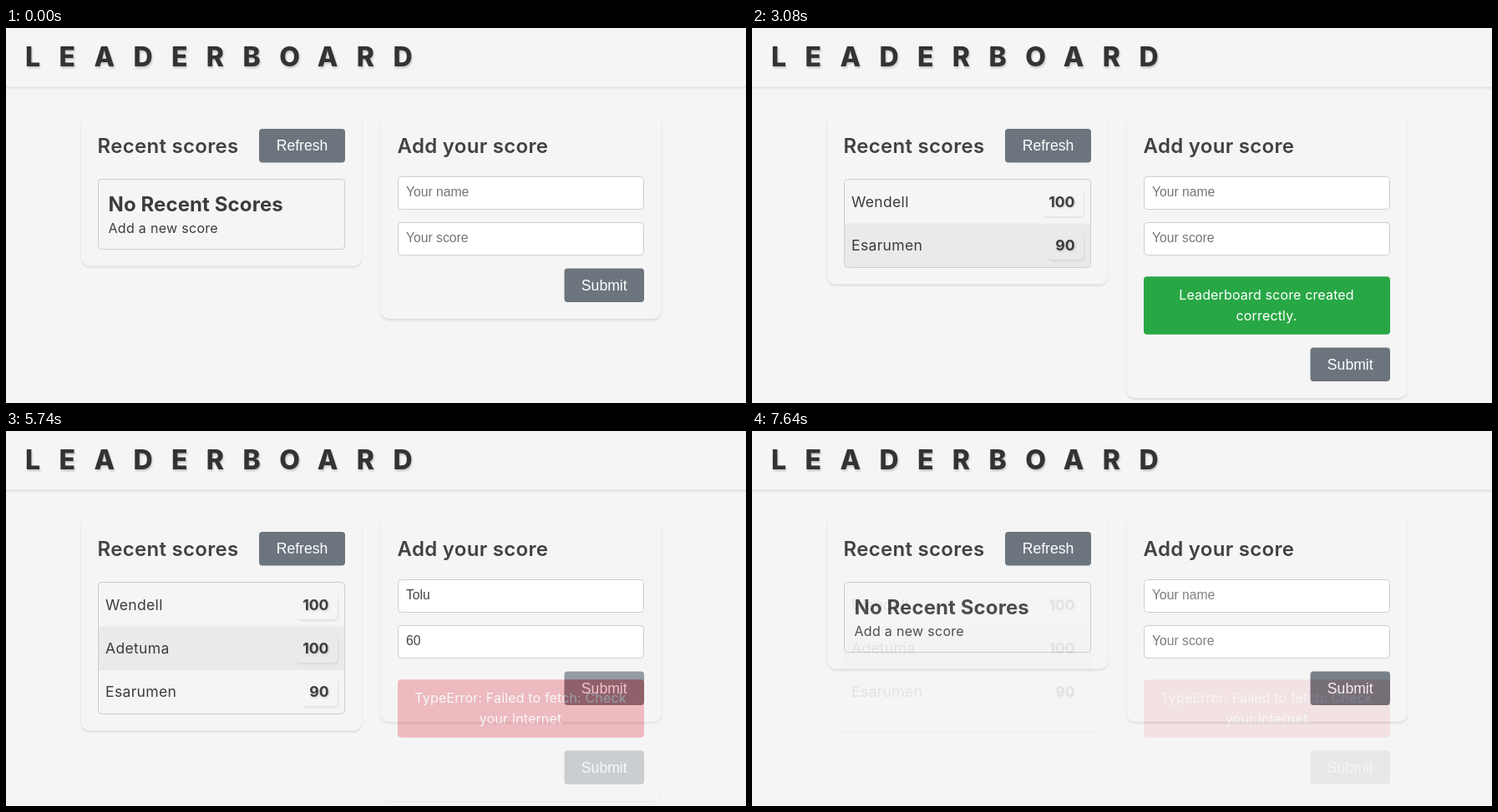
Write an HTML page that moves like this. It is 886 px wide and 450 px high and loops after 7.7 s.

```html
<!DOCTYPE html>
<html lang="en">
<head>
<meta charset="utf-8">
<title>Leaderboard</title>
<style>
html, body { margin: 0; width: 100%; height: 100%; overflow: hidden; background: #f5f5f5; }
svg { display: block; width: 886px; height: 450px; }
text { font-family: Inter, "Open Sans", sans-serif; font-size: 16px; letter-spacing: .3px; fill: #3c3c3e; }
.title { font-size: 32px; font-weight: 800; letter-spacing: 22.4px; fill: #333; filter: drop-shadow(1px 2px 1px rgba(0,0,0,.2)); }
.head { font-size: 24px; font-weight: 600; fill: #414143; }
.empty { font-size: 24px; font-weight: 700; letter-spacing: .1px; }
.name { font-size: 17.6px; }
.score { font-size: 17.6px; font-weight: 700; letter-spacing: 0; text-anchor: end; filter: drop-shadow(1px 1px 1px rgba(0,0,0,.18)); }
.field, .label { font-family: "Liberation Sans", Arial, sans-serif; letter-spacing: 0; }
.field { font-size: 15.7px; fill: #444; }
.hint { fill: #757575; }
.label { font-size: 17.6px; fill: #fff; text-anchor: middle; }
.note { text-anchor: middle; letter-spacing: .15px; }
.light { fill: #fff; }
.bar { fill: #f5f5f5; filter: drop-shadow(0 2px 1px rgba(0,0,0,.09)); }
.card { fill: #f5f5f5; filter: drop-shadow(0 2.5px 1.2px rgba(0,0,0,.1)); }
.badge { filter: drop-shadow(1px 2px 1px rgba(0,0,0,.08)); }
.list { fill: none; stroke: #cbcdce; }
.input { fill: #fff; stroke: #cbcfd2; }
.button { fill: #6c757d; }
</style>
</head>
<body>
<svg id="stage" viewBox="0 0 886 450"></svg>
<script>
const HOLD = 1000, STEP = 60, SLOT = 1540;

const rect = (x, y, w, h, r, cls, extra = '') =>
  `<rect x="${x}" y="${y}" width="${w}" height="${h}" rx="${r}" class="${cls}" ${extra}/>`;
const text = (x, y, cls, str) => `<text x="${x}" y="${y}" class="${cls}">${str}</text>`;
const button = (x, y, w, str) =>
  rect(x, y, w, 40.5, 4, 'button') + text(x + w / 2, y + 26, 'label', str);
const card = (x, bottom) => rect(x, 101, 336, bottom - 101, 10, 'card');
const list = bottom => rect(110.5, 181.5, 295, bottom - 181.5, 4, 'list');

const input = (y, value, hint) =>
  rect(469.5, y, 294, 39, 4, 'input') +
  text(479, y + 23.7, value ? 'field' : 'field hint', value || hint);

function row([name, score], i, rows) {
  const y = 182.5 + i * 52, w = score > 99 ? 50 : 43, odd = i % 2;
  const r = i === rows.length - 1 ? 4 : 0;
  const fill = odd ? '#eaeaea' : '#f5f5f5';
  const stripe = odd
    ? `<path fill="${fill}" d="M111 ${y}h294v${52.5 - r}q0 ${r} ${-r} ${r}h${2 * r - 294}q${-r} 0 ${-r} ${-r}z"/>`
    : '';
  return stripe + rect(397 - w, y + 9.5, w, 34, 5, 'badge', `fill="${fill}"`) +
    text(119, y + 32.5, 'name', name) + text(386.5, y + 32.5, 'score', score);
}

function scores(rows) {
  const bottom = rows.length ? 183.5 + rows.length * 52 : 265.5;
  const body = rows.length
    ? rows.map(row).join('')
    : text(122.5, 220, 'empty', 'No Recent Scores') + text(122.5, 246, '', 'Add a new score');
  return card(90, bottom + 20) + text(109.5, 150, 'head', 'Recent scores') +
    button(303, 121, 103, 'Refresh') + body + list(bottom);
}

function form({ name, score, note }) {
  const height = note ? 19.5 + note.lines.length * 25 : 0;
  const y = note ? 314 + height : 288.5;
  const alert = note
    ? rect(469, 298.3, 295, height, 4, '', `fill="${note.fill}"`) +
      note.lines.map((s, i) => text(616, 326 + i * 25, 'note ' + note.tone, s)).join('')
    : '';
  return card(448.5, y + 60.5) + text(468.5, 150, 'head', 'Add your score') +
    input(178.5, name, 'Your name') + input(233.5, score, 'Your score') +
    alert + button(668.5, y, 95.5, 'Submit');
}

const first = ['Wendell', 100], second = ['Adetuma', 100], third = ['Esarumen', 90];
const all = [first, second, third];
const busy = { fill: '#ffc107', tone: '', lines: ['Creating leaderboard score...'] };
const done = { fill: '#28a745', tone: 'light', lines: ['Leaderboard score created', 'correctly.'] };
const fail = { fill: '#dc3545', tone: 'light', lines: ['TypeError: Failed to fetch: Check', 'your Internet'] };

const slides = [
  { rows: [] },
  { rows: [first], name: third[0], score: 90, note: busy },
  { rows: [first, third], note: done },
  { rows: all, name: 'Tolu', score: 60 },
  { rows: all, name: 'Tolu', score: 60, note: fail }
];

const stage = document.getElementById('stage');
stage.innerHTML = slides.map(s =>
  `<g class="slide">${rect(0, 0, 886, 450, 0, '', 'fill="#f5f5f5"')}${scores(s.rows)}${form(s)}</g>`
).join('') + rect(-5, -5, 896, 75.5, 0, 'bar') + text(23, 45.5, 'title', 'LEADERBOARD');
const groups = [...stage.querySelectorAll('.slide')];
const header = stage.querySelector('.bar');

let shown = -1;
function draw(now) {
  const t = now % (SLOT * slides.length);
  const i = Math.floor(t / SLOT), fade = t % SLOT - HOLD;
  const mix = fade < 0 ? 0 : (Math.floor(fade / STEP) + 1) / 10;
  const next = (i + 1) % slides.length;
  if (i !== shown) {
    stage.insertBefore(groups[i], header);
    stage.insertBefore(groups[next], header);
    shown = i;
  }
  groups.forEach((g, k) => {
    g.style.display = k === i || (k === next && mix) ? '' : 'none';
    g.style.opacity = k === next ? mix : 1;
  });
}

const start = performance.now();
function tick() {
  draw(performance.now() - start);
  requestAnimationFrame(tick);
}
tick();
</script>
</body>
</html>
```
